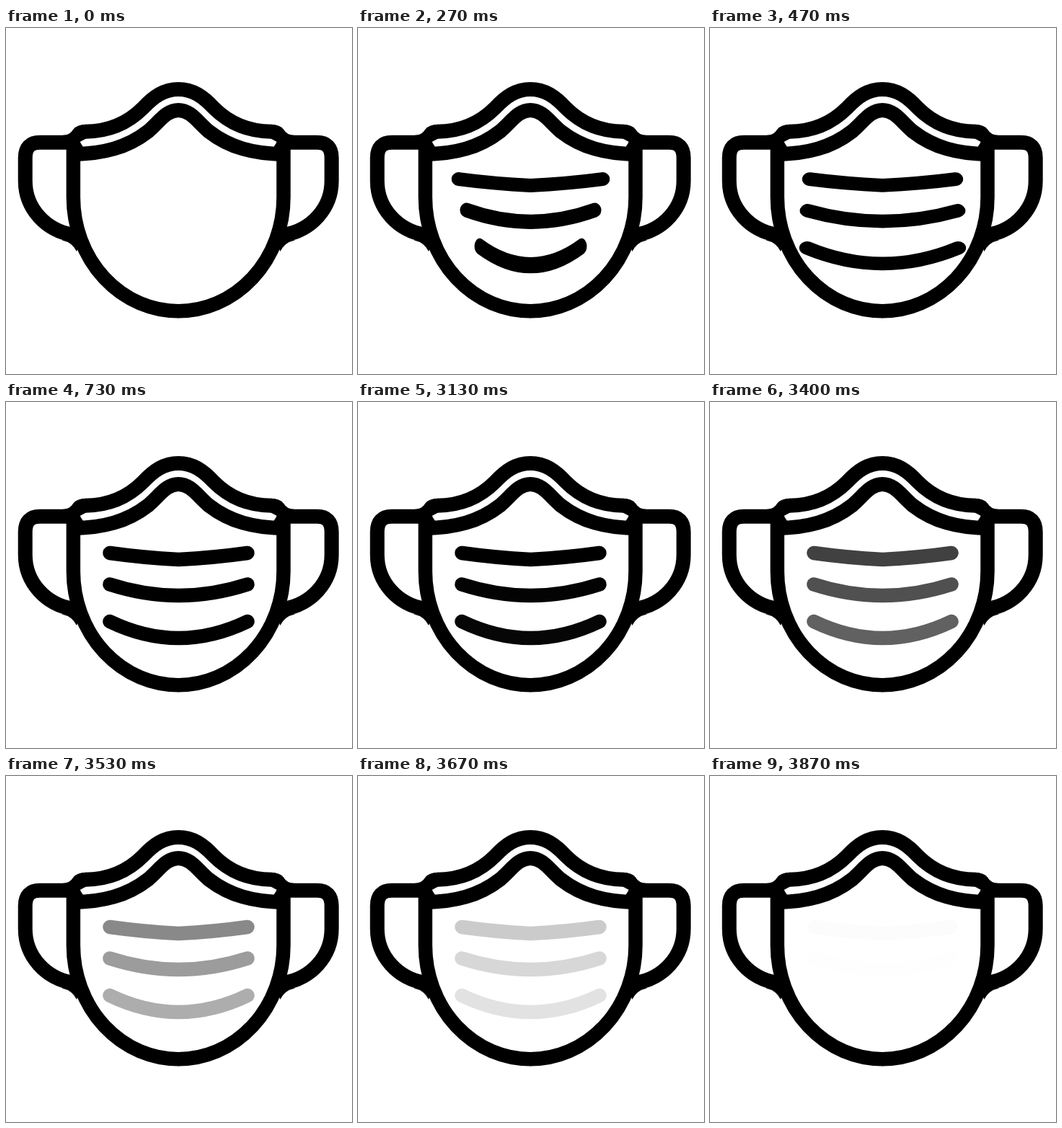
Animation, 480 px wide and 480 px high, one loop 4.39 s. Source, as an HTML page:

```html
<!DOCTYPE html>
<html lang="en">
<head>
<meta charset="utf-8">
<title>Face mask</title>
<style>
  html, body { margin: 0; width: 100%; height: 100%; overflow: hidden; background: #fff; }
  svg { display: block; width: 100vw; height: 100vh; }
</style>
</head>
<body>
<svg viewBox="0 0 480 480" fill="none" stroke="#000" stroke-width="20" stroke-linejoin="round">
  <defs>
    <g id="half">
      <!-- ear loop, upper edge, lower edge, side and chin -->
      <path d="M93 158.7H47Q26.7 158.7 26.7 180V212C26.7 250 55 281 93 287"/>
      <path d="M110 143.8C141 143.5 167 134 190 111C205 95 219 85 239.5 85"/>
      <path d="M93 175.2C135 174.5 168 166 197 143.5C213 130 222 114 239.5 114"/>
      <path d="M93.4 158V235A145.8 157.7 0 0 0 239.5 392.7" stroke-width="19.5"/>
      <!-- fillets where the loop meets the mask -->
      <g fill="#000" stroke="none">
        <path d="M78 149Q89 148.5 93 141Q98 134 111 133.8V153.6L102.5 158L107 165H84Z"/>
        <path d="M78 294.5Q92 297.5 98 310L106 290L84 275Z"/>
      </g>
    </g>
  </defs>
  <use href="#half"/>
  <use href="#half" transform="matrix(-1 0 0 1 478.4 0)"/>
  <g id="pleats" stroke-width="19.5" stroke-linecap="round">
    <path d="M144 209.5Q190 216 239.5 218.5Q289 216 335 209.5"/>
    <path d="M144 253Q239.5 284 335 253"/>
    <path d="M144 304.5Q239.5 350.5 335 304.5"/>
  </g>
</svg>
<script>
const LOOP = 4390, STEP = 1000 / 15, CX = 239.5;
const FADE_END = 58 * STEP;
const pleats = [...document.querySelectorAll('#pleats path')];
const centers = [214, 261, 316];

const clamp = u => Math.max(0, Math.min(1, u));
const easeInOut = u => u < 0.5 ? 2 * u * u : 1 - 2 * (1 - u) ** 2;
const backOut = u => 1 + 2.70158 * (u - 1) ** 3 + 1.70158 * (u - 1) ** 2;

function draw(now) {
  // The motion advances at 15 steps per second.
  const t = Math.floor((now % LOOP + 3.4) / STEP) * STEP;
  pleats.forEach((pleat, i) => {
    const sx = t ? backOut(clamp((t - 20 - 60 * i) / 590)) : 0;
    const sy = 1 + (1 - sx) * 0.55;
    const cy = centers[i];
    const fade = easeInOut(clamp((Math.min(t, FADE_END) - 3108 + 33 * i) / 820));
    pleat.setAttribute('transform', `translate(${CX} ${cy}) scale(${sx} ${sy}) translate(${-CX} ${-cy})`);
    pleat.setAttribute('opacity', sx > 0.001 ? 1 - fade : 0);
  });
}

const start = performance.now();
function tick() {
  draw(performance.now() - start);
  requestAnimationFrame(tick);
}
tick();
</script>
</body>
</html>
```
